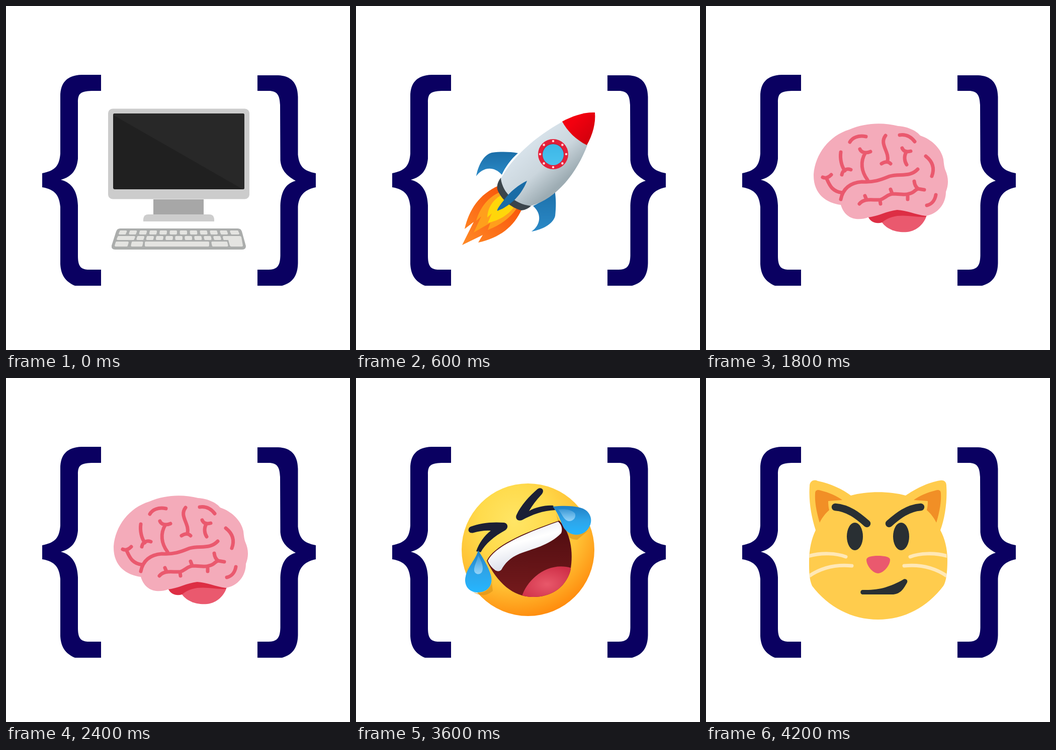
Recreate the animation shown at these times as an HTML page. Size 684 by 685 pixels, loop 4.8 s.

```html
<!DOCTYPE html>
<html lang="en">
<head>
<meta charset="utf-8">
<title>Braces</title>
<style>
html, body { margin: 0; width: 100%; height: 100%; overflow: hidden; background: #fff; }
svg { display: block; width: 100vw; height: 100vh; }
.pic { opacity: 0; }
.line { fill: none; stroke-linecap: round; stroke-linejoin: round; }
</style>
</head>
<body>
<svg viewBox="0 0 684 685">
<defs>
  <linearGradient id="hull" gradientUnits="userSpaceOnUse" x1="340" y1="270" x2="410" y2="350">
    <stop offset="0" stop-color="#d9e4ec"/><stop offset=".55" stop-color="#cbd6dd"/><stop offset="1" stop-color="#9dacb3"/>
  </linearGradient>
  <linearGradient id="nose" x1="0" y1="0" x2="1" y2="1">
    <stop offset=".3" stop-color="#f3000f"/><stop offset="1" stop-color="#c9000c"/>
  </linearGradient>
  <linearGradient id="fin" x1="0" y1="0" x2="0" y2="1">
    <stop offset="0" stop-color="#1c6fa9"/><stop offset="1" stop-color="#2b8ac7"/>
  </linearGradient>
  <linearGradient id="glass" x1="0" y1="0" x2="0" y2="1">
    <stop offset="0" stop-color="#3cb6e6"/><stop offset="1" stop-color="#4bc2ee"/>
  </linearGradient>
  <linearGradient id="fire" gradientUnits="userSpaceOnUse" x1="310" y1="380" x2="212" y2="476">
    <stop offset="0" stop-color="#f9560b"/><stop offset="1" stop-color="#ff8a26"/>
  </linearGradient>
  <radialGradient id="skin" gradientUnits="userSpaceOnUse" cx="315" cy="285" r="200">
    <stop offset="0" stop-color="#ffe566"/><stop offset=".35" stop-color="#ffdb4c"/>
    <stop offset=".65" stop-color="#ffc235"/><stop offset="1" stop-color="#ff870a"/>
  </radialGradient>
  <linearGradient id="mouth" x1="0" y1="0" x2="0" y2="1">
    <stop offset="0" stop-color="#4d0c10"/><stop offset="1" stop-color="#751a1c"/>
  </linearGradient>
  <linearGradient id="teeth" x1="0" y1="0" x2=".4" y2="1">
    <stop offset="0" stop-color="#d9dcea"/><stop offset=".5" stop-color="#fff"/><stop offset="1" stop-color="#d5d9e6"/>
  </linearGradient>
  <radialGradient id="tongue" cx=".5" cy=".55" r=".6">
    <stop offset="0" stop-color="#e8586a"/><stop offset="1" stop-color="#cf3048"/>
  </radialGradient>
  <linearGradient id="tear" x1="0" y1="0" x2="0" y2="1">
    <stop offset="0" stop-color="#1f7fc4"/><stop offset=".5" stop-color="#2ea4e8"/><stop offset="1" stop-color="#25b6ff"/>
  </linearGradient>
  <linearGradient id="shine" x1="0" y1="0" x2="0" y2="1">
    <stop offset="0" stop-color="#c9eaff" stop-opacity=".15"/><stop offset="1" stop-color="#c9eaff" stop-opacity=".65"/>
  </linearGradient>
  <clipPath id="catClip"><use href="#catHead"/></clipPath>
  <clipPath id="mouthClip"><use href="#grin"/></clipPath>
</defs>

<g fill="#0a0061">
  <path d="M189 137H150C122 138 108 152 108 180V294C106 318 98 328 72 333V361C98 365 106 378 108 400V514C109 535 118 549 137 557H189V525H162C147 524 143 516 143 497V397C142 370 132 352 109 346C132 340 141 325 143 304V192C143 174 148 170 170 169H189Z"/>
  <path d="M500 138H541C566 139 580 152 580.500 181V296C583 318 590 328 616 333V361C591 366 582 380 580.500 400V512C580 537 570 551 549 557H500V525H522C541 525 545 515 545.500 497V397C547 370 555 354 576 348C556 337 547 325 545.500 307L545 197C544 178 540 169 522 169H500Z"/>
</g>

<g id="computer" class="pic">
  <rect x="203" y="204.500" width="281" height="180" rx="9" fill="#ccc"/>
  <rect x="213" y="214" width="261" height="151" rx="3.500" fill="#202020"/>
  <path d="M213 217Q213 214 216 214H471Q474 214 474 217V362Q474 365 471 365Z" fill="#282828"/>
  <path d="M293 385H393V416H293Z" fill="#a7a7a7"/>
  <path d="M273 429V424Q274 415 283 415H404Q413 415 414 424V429Z" fill="#cdcdcd"/>
  <path d="M227 443H461Q467 443 469 449L477 478Q477 485 470 485H217Q209 485 210 477L219 449Q221 443 227 443Z" fill="#abadac"/>
  <g id="keys" fill="#e4e4e1">
    <path d="M433 458H465Q467 458 468 460L471 477Q471 479 469 479H448Q446 479 445 477L442 466H435Q432 466 432 464L431 460Q431 458 433 458Z"/>
  </g>
</g>

<g id="rocket" class="pic">
  <path d="M283 358C245 375 225 405 216 444L234 430L211 476L252 456L243 471C285 462 314 440 330 404Z" fill="url(#fire)"/>
  <path d="M285 371C259 383 245 406 239 428L249 419L234 451L267 432L262 446C288 436 306 422 319 404Z" fill="#ff9f1c"/>
  <path d="M288 377C270 388 262 403 261 421L270 413L262 432C285 427 302 416 313 402Z" fill="#ffd60a"/>
  <path d="M322 293C305 290 287 290 270 292C254 296 243 317 239 339C250 323 272 316 290 336C296 322 308 305 322 293Z" fill="url(#fin)"/>
  <path d="M395 366C398 383 398 401 396 418C392 434 371 445 349 449C365 438 372 416 352 398C370 390 383 380 395 366Z" fill="url(#fin)"/>
  <path d="M288 342C280 352 279 362 283 370C292 388 310 402 329 407C337 406 343 403 348 398L300 360Z" fill="#3b454c"/>
  <path d="M411 230C355 261 310 302 288 344C292 372 315 394 347 398C400 384 440 330 460 277Z" fill="url(#hull)"/>
  <path d="M410 230C430 219 454 211 475 212C477 232 471 256 459 277C438 267 420 249 410 230Z" fill="url(#nose)"/>
  <circle cx="392" cy="295" r="30" fill="#e4203a"/>
  <circle cx="392" cy="295.500" r="22" fill="#c01a33"/>
  <circle cx="392" cy="296" r="21" fill="url(#glass)"/>
  <g id="rivets" fill="#ffd5da"/>
  <path d="M340 348C325 355 305 370 293 388C285 398 280 405 281 408C295 403 312 392 325 375C333 364 338 354 340 348Z" fill="#1a6ca6"/>
</g>

<g id="brain" class="pic">
  <path d="M348 428C358 445 380 452 400 450C420 448 435 432 439 416C415 411 395 410 375 410Z" fill="#ea596e"/>
  <path d="M322 419C345 411 365 403 380 403C400 404 420 411 440 414L437 420C410 422 378 408 350 431C340 434 328 432 322 419Z" fill="#dd2e44"/>
  <path d="M214 335C217 295 245 258 285 246C315 233 350 231 382 239C400 240 418 248 426 258C450 266 468 285 472 305C473 315 474 322 476 327C482 340 483 355 477 370C477 394 461 414 437 418C415 415 400 407 380 406C360 408 342 419 322 421C303 428 277 426 268 396C240 392 213 375 214 335Z" fill="#f4abba"/>
  <path class="line" stroke="#ea596e" stroke-width="7" d="M286 271C291 262 303 257 318 260M385 257C398 255 408 261 415 270M357 258C344 275 365 290 361 309M349 314Q360 307 367 314M268 291C266 305 270 320 276 328M270 336C272 326 280 323 288 326M306 285C309 292 318 294 327 290M317 292C306 310 309 330 321 346M390 283C393 290 400 291 407 289M398 291C393 300 395 310 399 316M437 299C451 310 455 323 449 339M457 376C455 388 448 395 439 397M268 385C272 365 285 352 310 350C335 352 350 345 365 339C385 333 405 342 421 325M232 341Q240 345 249 336M240 344C245 355 250 370 272 372M305 394C315 382 330 387 346 386C358 382 360 375 372 374C385 374 395 377 403 374C415 372 415 365 422 364L434 366M316 378L319 385M346 387L347 394M367 365L370 373M401 377V385M414 349C415 358 419 362 422 364"/>
</g>

<g id="blush" class="pic">
  <circle cx="346.500" cy="345.500" r="139" fill="#ffcc4d"/>
  <g fill="#ff7892"><circle cx="262" cy="384" r="39"/><circle cx="431" cy="384" r="39"/></g>
  <g fill="#f5f8fa"><circle cx="296.500" cy="334" r="42.500"/><circle cx="396.500" cy="334" r="42.500"/></g>
  <g fill="#292f33"><circle cx="296.500" cy="334" r="19.500"/><circle cx="396.500" cy="334" r="19.500"/></g>
  <path class="line" stroke="#664500" stroke-width="16" d="M254 284C267 264 287 254 308 253M385 253C406 254 426 264 439 284M315 430H377"/>
</g>

<g id="laugh" class="pic">
  <circle cx="342" cy="342" r="132" fill="url(#skin)"/>
  <path d="M398 270C410 303 432 324 464 302L440 322C420 322 405 305 398 270ZM232 426C250 432 264 425 270 408L272 424C258 436 245 434 232 426Z" fill="#c98510" opacity=".45"/>
  <path id="grin" d="M260 364C274 335 328 310 404 284C425 304 434 345 426 385C415 420 385 437 350 436C312 435 281 408 260 364Z" fill="url(#mouth)"/>
  <path clip-path="url(#mouthClip)" d="M329 438C338 402 382 363 430 379V440Z" fill="url(#tongue)"/>
  <path d="M262 364C275 337 328 312 402 286C409 292 411 301 408 309C384 334 350 340 325 350C306 358 296 369 289 382Q284 387 277 383Q267 376 262 364Z" fill="url(#teeth)"/>
  <g fill="#1b1f35">
    <path d="M224 300C222 306 227 310 234 308C245 305 257 303 268 304C255 314 245 328 239 345L248 347C257 330 275 315 297 303C304 298 302 289 294 288C270 286 245 289 228 296Q225 297 224 300Z"/>
    <path d="M369 220C374 223 372 229 368 233C358 244 350 254 344 265C358 257 376 253 392 254L396 263C372 264 350 272 330 283C322 286 316 280 319 273C328 253 345 235 361 221Q365 218 369 220Z"/>
  </g>
  <path d="M243 343C252 358 263 375 268 392C274 412 262 427 242 427C222 427 214 410 218 395C222 375 238 362 243 343Z" fill="url(#tear)"/>
  <path d="M243 353C250 366 255 378 250 387C245 393 237 391 235 384C234 374 241 365 243 353Z" fill="url(#shine)"/>
  <path d="M391 256C410 254 430 254 445 258C463 262 471 278 466 292C458 314 432 319 416 302C408 293 404 270 391 256Z" fill="url(#tear)"/>
  <path d="M402 262C415 260 428 262 435 269C439 277 432 286 422 285C412 282 410 270 402 262Z" fill="url(#shine)"/>
</g>

<g id="cat" class="pic">
  <path id="catHead" d="M206 215C206 206 214 201 222 205C248 210 272 222 288 234C320 225 365 225 397 234C415 222 440 208 466 204C474 203 478 207 478 215C480 245 475 280 466 303C475 320 480 340 480 362C480 385 478 405 472 414C440 456 395 481 342 481C290 481 243 456 211 414C205 400 205 385 205 365C205 340 210 320 218 303C209 275 204 245 206 215Z" fill="#ffcc4d"/>
  <g id="catSide">
    <path d="M217 230C217 223 222 222 228 224C245 228 260 235 271 243L243 245Q243 256 245 263C237 270 231 278 226 288C219 265 216 245 217 230Z" fill="#f18f26"/>
    <ellipse cx="296" cy="315.500" rx="16" ry="27.500" fill="#292f33"/>
    <path class="line" stroke="#292f33" stroke-width="14.500" d="M257 257C283 259 302 274 320 290"/>
    <path class="line" clip-path="url(#catClip)" stroke="#ffe8b6" stroke-width="7" d="M203 355C230 347 260 349 278 356M204 395C230 377 260 371 290 374"/>
  </g>
  <use href="#catSide" transform="matrix(-1 0 0 1 684 0)"/>
  <path d="M319 362C319 356 330 354 342 354C354 354 366 356 366 362C366 374 352 389 342 389C332 389 319 374 319 362Z" fill="#ea596e"/>
  <path d="M311 422C345 423 365 416 391 402C396 398 402 402 400 407C392 422 385 431 370 431H311C306 431 306 422 311 422Z" fill="#292f33"/>
</g>
</svg>
<script>
const LOOP = 4800;
const $ = id => document.getElementById(id);

function add(parent, tag, attrs) {
  const el = document.createElementNS('http://www.w3.org/2000/svg', tag);
  for (const k in attrs) el.setAttribute(k, attrs[k]);
  parent.append(el);
}

// Keys lean outwards away from the middle of the keyboard.
function key(x, y, w, h) {
  const lean = (x + w / 2 - 343) / 60;
  const r = 2;
  add($('keys'), 'path', {
    d: `M${x - lean / 2 + r} ${y}h${w - 2 * r}q${r} 0 ${r} ${r}l${lean} ${h - 2 * r}q0 ${r} ${-r} ${r}` +
       `h${2 * r - w}q${-r} 0 ${-r} ${-r}l${-lean} ${2 * r - h}q0 ${-r} ${r} ${-r}z`
  });
}
for (let i = 0; i < 12; i++) key(225 + 20.1 * i, 447, i < 11 ? 14.5 : 17, 8);
key(221, 458, 35, 8);
for (let i = 0; i < 9; i++) key(260 + 19.1 * i, 458, 14.5, 8);
key(217, 469, 26, 10);
key(249, 469, 23, 10);
key(276, 469, 128, 10);
key(409, 469, 32, 10);

for (let i = 0; i < 8; i++) {
  const a = i * Math.PI / 4;
  add($('rivets'), 'circle', { cx: 392 + 26 * Math.cos(a), cy: 295 + 26 * Math.sin(a), r: 2.3 });
}

const scenes = [
  ['computer', 0], ['rocket', 600], ['brain', 1800],
  ['blush', 3000], ['laugh', 3600], ['cat', 4200]
];
scenes.forEach(([id, start], i) => {
  const end = i + 1 < scenes.length ? scenes[i + 1][1] : LOOP;
  const step = (time, opacity) => ({ offset: time / LOOP, opacity, easing: 'step-end' });
  const frames = [step(start, 1)];
  if (start > 0) frames.unshift(step(0, 0));
  if (end < LOOP) frames.push(step(end, 0));
  frames.push(step(LOOP, end < LOOP ? 0 : 1));
  const anim = $(id).animate(frames, { duration: LOOP, iterations: Infinity });
  anim.startTime = 0;
});
</script>
</body>
</html>
```
